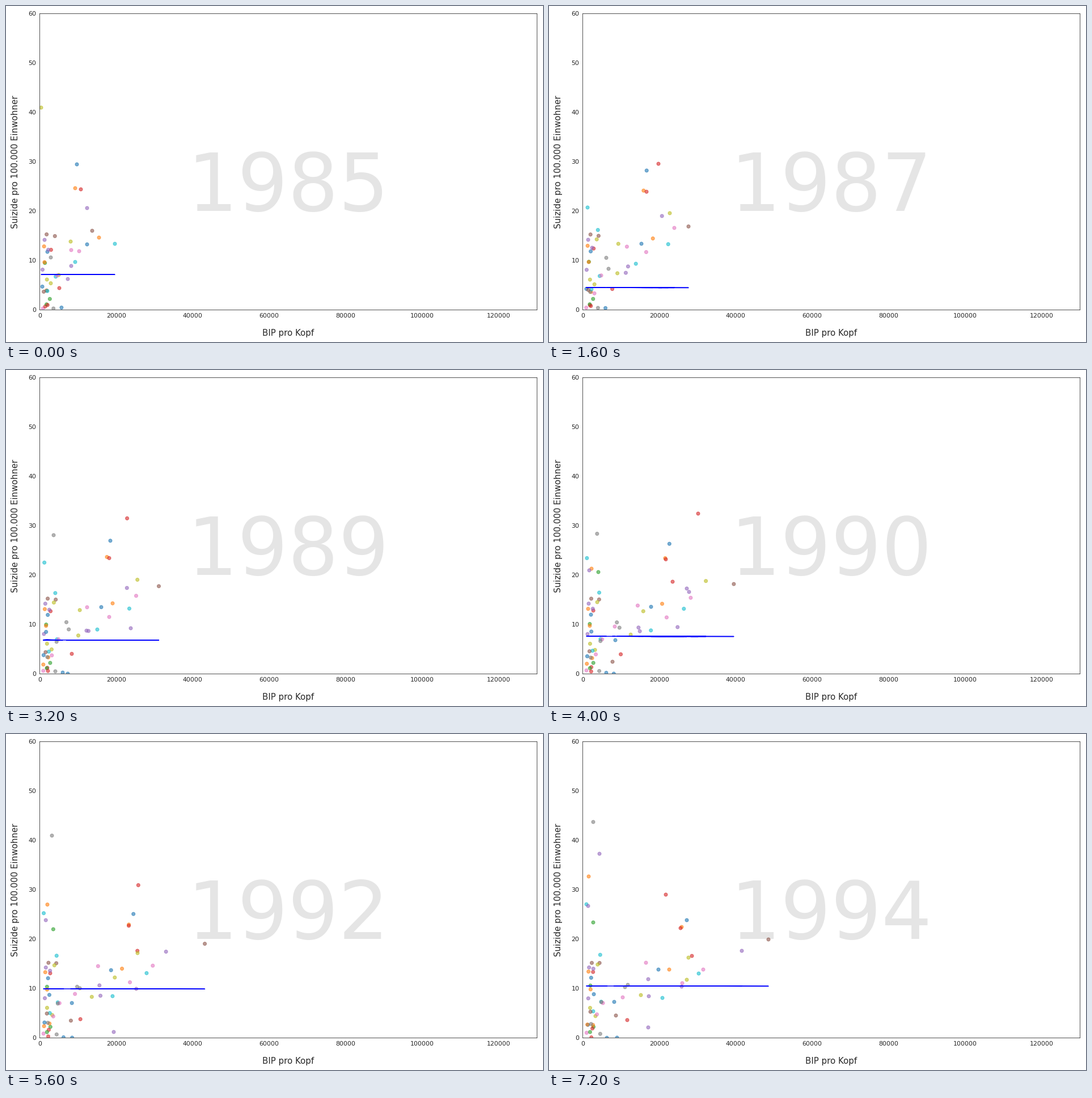
Recreate the animation shown at these times as a matplotlib script. Size 947 by 592 pixels, loop 8 s.

```python
import matplotlib.pyplot as plt
import numpy as np
from matplotlib.animation import FuncAnimation
from matplotlib.colors import to_rgba

W, H, DPI = 947, 592, 64
PX = 72 / DPI                       # points per pixel
LEFT, RIGHT, TOP, BOTTOM = 59.3, 936.2, 13.2, 535.3
X_MAX, Y_MAX = 130000, 60
FIRST, LAST = 1985, 1994
INK = "#262626"

# Shared course of the economy and height of the trend line at key years.
KEY_YEARS = (1985, 1987, 1989, 1990, 1991, 1993, 1994)
GROWTH = (0, 0.4, 0.5, 0.74, 0.79, 0.9, 1)
TREND = (7.15, 4.5, 6.85, 7.6, 8.85, 11, 10.5)

plt.rcParams["font.family"] = "DejaVu Sans"

dots = {year: [] for year in range(FIRST, LAST + 1)}


def data_x(x):
    return (x - LEFT) / (RIGHT - LEFT) * X_MAX


def data_y(y):
    return (BOTTOM - y) / (BOTTOM - TOP) * Y_MAX


def walk(hue, start, end, first=FIRST, last=LAST, pace=1):
    """Move a country between two pixel points along the shared growth curve."""
    grown = np.interp([first, last], KEY_YEARS, GROWTH)
    for year in range(first, last + 1):
        gain = np.interp(year, KEY_YEARS, GROWTH) - grown[0]
        far = (gain / max(grown[1] - grown[0], 1e-9)) ** pace
        time = (year - first) / max(last - first, 1)
        x = start[0] + (end[0] - start[0]) * far
        y = start[1] + (end[1] - start[1]) * time
        dots[year].append((x, y, f"C{hue}"))


# Wealthy countries, present throughout
walk(0, (125, 279), (243, 328))
walk(0, (143, 420), (193, 415))
walk(1, (122, 321), (234, 340))
walk(1, (164, 408), (212, 415))
walk(3, (132, 323), (232, 342))
walk(3, (94, 497), (138, 504))
walk(4, (115, 458), (176, 462))
walk(4, (109, 481), (175, 432))
walk(5, (152, 396), (387, 362))
walk(6, (129, 432), (235, 439))
walk(6, (115, 430), (171, 403))
walk(7, (79, 443), (134, 446))
walk(8, (114, 415), (243, 433), pace=3)
walk(8, (93, 474), (162, 460))
walk(9, (192, 419), (264, 422), pace=1.5)
walk(9, (122, 451), (200, 465))

# Wealthy countries that join or leave
walk(4, (143, 356), (254, 398), last=1991)
walk(3, (193, 278), (263, 253), first=1987, last=1990)
walk(3, (243, 258), (206, 283), first=1991)
walk(6, (221, 391), (272, 415), first=1987)
walk(8, (213, 365), (286, 374), first=1987, last=1991)
walk(7, (105, 463), (139, 442), first=1987)
walk(4, (220, 455), (234, 445), first=1989)
walk(4, (243, 385), (340, 382), first=1990)
walk(3, (218, 373), (252, 391), first=1990)
walk(6, (116, 452), (130, 464), first=1990)
walk(5, (112, 514), (118, 496), first=1990)
walk(0, (117, 476), (115, 472), first=1990)
walk(0, (109, 535), (120, 535), first=1989)
walk(8, (232, 386), (246, 394), first=1992)
walk(4, (190, 525), (175, 517), first=1992)

# Poorer countries with many cases
walk(8, (62, 179), (63, 204), last=1986)
walk(9, (68, 355), (66, 300), first=1987)
walk(7, (84, 291), (85, 286), first=1989, last=1991)
walk(1, (75, 350), (70, 251), first=1990)
walk(4, (71, 353), (69, 303), first=1990)
walk(2, (87, 356), (78, 332), first=1990)
walk(3, (83, 179), (83, 179), first=1991, last=1991)
walk(7, (81, 179), (78, 155), first=1992)
walk(4, (87, 205), (89, 211), first=1993)

# Crowd of small economies near the axis
rng = np.random.default_rng(7)
for k in range(32):
    x = 63 + min(rng.gamma(2, 6), 45)
    y = 533 - 150 * rng.random() ** 1.6
    end = x + rng.normal(4, 3), min(y + rng.normal(0, 8), BOTTOM)
    joined = FIRST if k < 26 else rng.integers(1987, 1991)
    walk(k % 10, (x, y), (max(end[0], 62), end[1]), first=int(joined))

fig = plt.figure(figsize=(W / DPI, H / DPI), dpi=DPI, facecolor="white")
ax = fig.add_axes([LEFT / W, 1 - BOTTOM / H, (RIGHT - LEFT) / W, (BOTTOM - TOP) / H])
ax.set(xlim=(0, X_MAX), ylim=(0, Y_MAX),
       xticks=range(0, X_MAX, 20000), yticks=range(0, Y_MAX + 1, 10))
ax.tick_params(length=0, pad=6 * PX, labelsize=11 * PX, labelcolor=INK)
for spine in ax.spines.values():
    spine.set(color=INK, linewidth=0.8 * PX)

label = dict(size=15 * PX, color=INK, ha="center", va="baseline",
             rotation_mode="anchor")
fig.text((LEFT + RIGHT) / 2 / W, 1 - 580.5 / H, "BIP pro Kopf", **label)
fig.text(21 / W, 1 - (TOP + BOTTOM) / 2 / H, "Suizide pro 100.000 Einwohner",
         rotation=90, **label)

year_text = ax.text(X_MAX / 2, data_y(360.6), "", size=140 * PX, color="#e5e5e5",
                    ha="center", va="baseline", zorder=0.5)
cloud = ax.scatter([], [], s=(6 * PX) ** 2, linewidths=PX, zorder=1)
trend, = ax.plot([], [], color="blue", lw=1.5 * PX, zorder=2)


def draw(i):
    year = FIRST + i
    xs, ys, hues = zip(*dots[year])
    gdp = data_x(np.array(xs))
    year_text.set_text(str(year))
    cloud.set_offsets(np.column_stack([gdp, data_y(np.array(ys))]))
    cloud.set_color([to_rgba(hue, 0.6) for hue in hues])
    # The line runs through the countries unsorted, which thickens its dense part.
    trend.set_data(gdp, np.interp(year, KEY_YEARS, TREND) - 1e-6 * gdp)
    return year_text, cloud, trend


anim = FuncAnimation(fig, draw, frames=LAST - FIRST + 1, interval=800,
                     repeat=True, repeat_delay=0)
plt.show()
```
